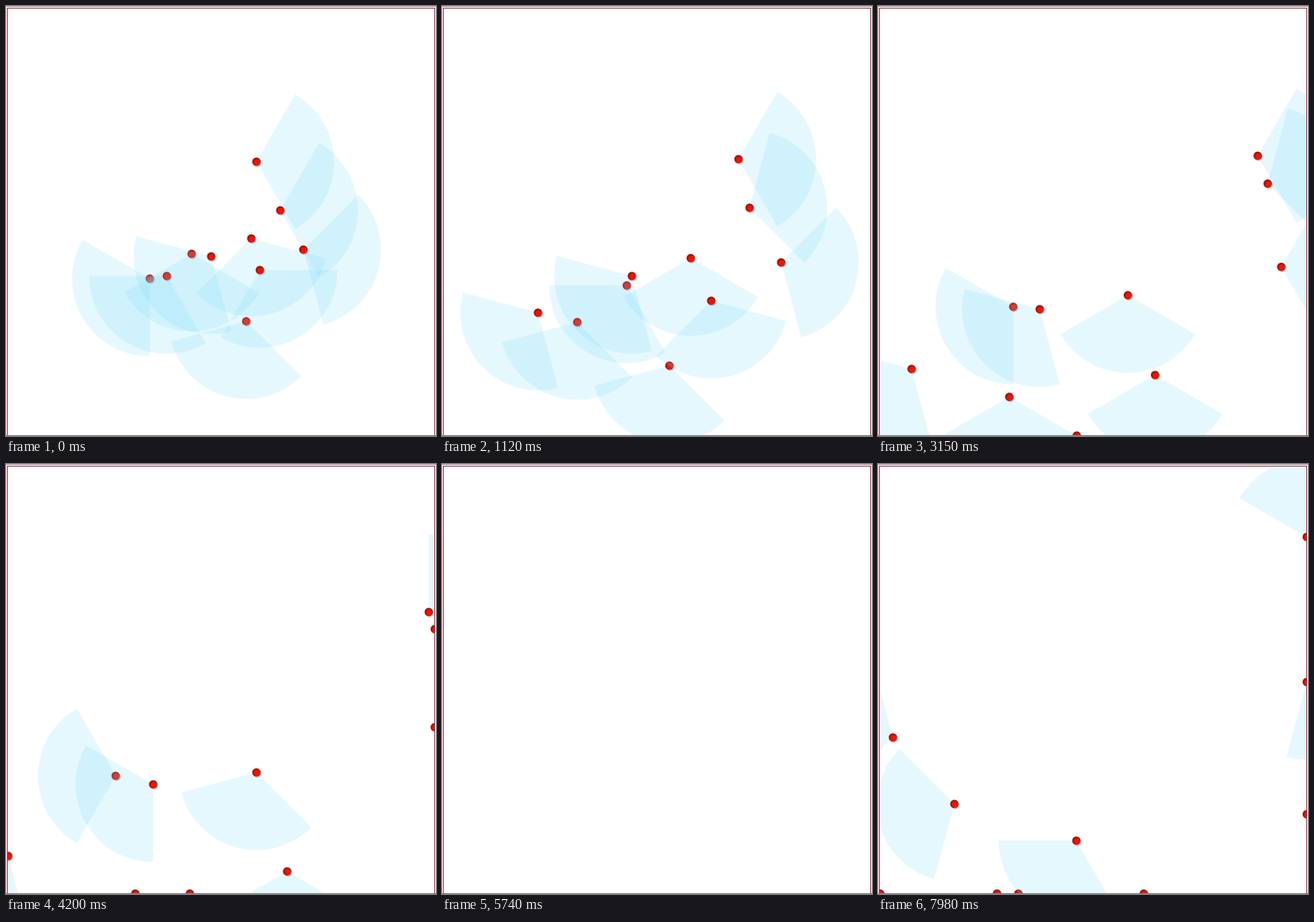
Recreate the animation shown at these times as a matplotlib script. Size 504 px wide and 504 px high, loop 8 s.

```python
import numpy as np
import matplotlib.pyplot as plt
from matplotlib.animation import FuncAnimation
from matplotlib.patches import Circle, Rectangle, Wedge

SIZE = 504
INTERVAL = 40
FRAMES = 200
TICK = 70                     # simulation step in ms
BLANK_TICKS = {82, 101, 102}  # the arena flickers empty
VIEW_RADIUS = 91
HALF_VIEW = 60
TURN = 15                     # headings snap to this many degrees
LEGS = (0, 16, 60, 114)       # ticks at which the waypoints are reached
LOW, HIGH = (2, 3), (502, 503)

fig = plt.figure(figsize=(SIZE / 100, SIZE / 100), dpi=100, facecolor="white")
ax = fig.add_axes([0, 0, 1, 1])
ax.set_xlim(0, SIZE)
ax.set_ylim(SIZE, 0)
ax.axis("off")

arena = Rectangle((2, 3), 500, 500, transform=ax.transData)


class Agent:
    """A ball that looks where it walks and is stopped by the walls."""

    def __init__(self, *waypoints):
        self.path = np.array(waypoints).T
        self.view = Wedge((0, 0), VIEW_RADIUS, 0, 1, color="#7ddcfa",
                          alpha=0.2, lw=0)
        self.balls = [
            (Circle((0, 0), 4.9, color="#8c8c96", alpha=0.4, lw=0), 1.3),
            (Circle((0, 0), 4.9, color="#a01414", lw=0), 0),
            (Circle((0, 0), 3.7, color="#f01400", lw=0), 0.8),
        ]
        self.artists = [self.view] + [ball for ball, _ in self.balls]
        for artist in self.artists:
            ax.add_patch(artist)
            artist.set_clip_path(arena)

    def position(self, tick):
        return np.array([np.interp(tick, LEGS, axis) for axis in self.path])

    def heading(self, tick):
        dx, dy = self.position(tick + 4) - self.position(tick - 4)
        return TURN * round(np.degrees(np.arctan2(dy, dx)) / TURN)

    def place(self, tick):
        center = np.clip(self.position(tick), LOW, HIGH) + 0.5
        heading = self.heading(tick)
        self.view.set_center(center)
        self.view.set_theta1(heading - HALF_VIEW)
        self.view.set_theta2(heading + HALF_VIEW)
        for ball, shift in self.balls:
            ball.set_center(center + shift)

    def show(self, visible):
        for artist in self.artists:
            artist.set_visible(visible)


# Back to front: later fields of view tint the balls below them.
# Waypoints may lie outside the arena; the agent then slides along the wall.
agents = [
    Agent((168, 319), (112, 359), (1, 459), (-60, 520)),
    Agent((217, 290), (216, 327), (128, 365), (17, 320)),
    Agent((188, 316), (158, 370), (151, 503), (139, 560)),
    Agent((240, 293), (222, 316), (172, 375), (89, 398)),
    Agent((281, 369), (266, 421), (215, 560), (164, 700)),
    Agent((287, 272), (291, 295), (293, 361), (232, 441)),
    Agent((297, 309), (315, 345), (329, 477), (311, 503)),
    Agent((321, 239), (360, 236), (506, 193), (565, 255)),
    Agent((348, 285), (397, 300), (511, 308), (820, 410)),
    Agent((293, 182), (347, 179), (495, 173), (502, 85)),
]


def strip(x, y, width, height, color):
    ax.add_patch(Rectangle((x, y), width, height, color=color, lw=0,
                           antialiased=False, zorder=5))


strip(0, 0, SIZE, 1, "#a0a0a0")
strip(1, 2, 502, 1, "#a83c50")
strip(1, 2, 1, 501, "#a83c50")
strip(502, 2, 1, 501, "#a83c50")
strip(0, 503, SIZE, 1, "#808080")


def update(frame):
    tick = round(frame * INTERVAL / TICK)
    for agent in agents:
        agent.show(tick not in BLANK_TICKS)
        agent.place(tick)
    return [artist for agent in agents for artist in agent.artists]


anim = FuncAnimation(fig, update, frames=FRAMES, interval=INTERVAL,
                     repeat=True, repeat_delay=0, blit=False)
plt.show()
```
